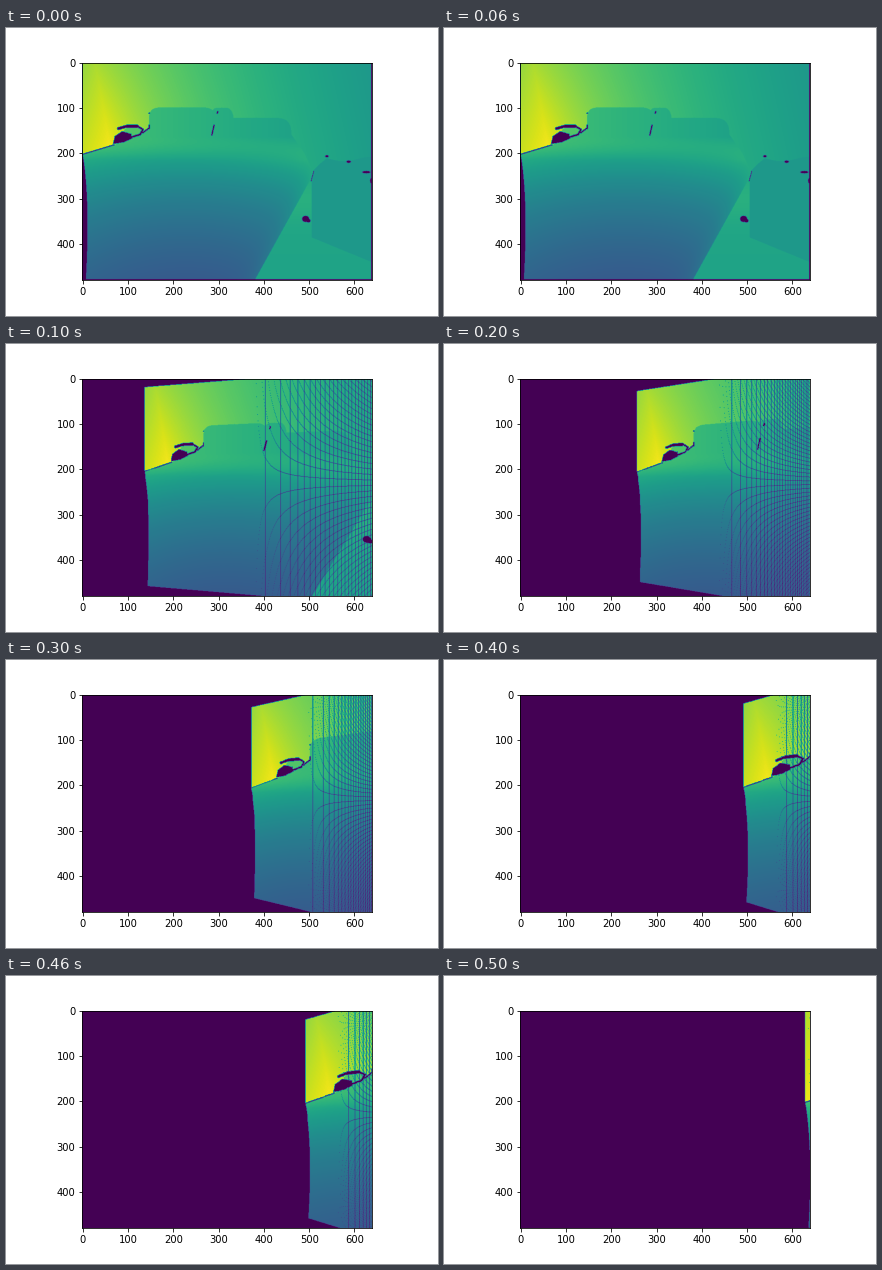
These frames come from a looping animation (432x288 px, 0.6 s). A matplotlib script:

```python
"""A depth map seen by a camera that yaws in equal steps, splatted pixel by pixel."""
import numpy as np
import matplotlib.pyplot as plt
from matplotlib.animation import FuncAnimation
from matplotlib.path import Path

W, H = 640, 480
FOCAL, CX, CY = 574.4, 320, 230
YAW_STEP = 0.2
FRAMES = 6

X, Y = np.meshgrid(np.arange(W, dtype=float), np.arange(H, dtype=float))
PIXELS = np.column_stack([X.ravel(), Y.ravel()])


def polygon(*points):
    return Path(points).contains_points(PIXELS).reshape(H, W)


def blob(x, y, rx, ry, power=2):
    """Ellipse, or a rounded box for a higher power."""
    return np.abs((X - x) / rx) ** power + np.abs((Y - y) / ry) ** power <= 1


def stroke(width, *points):
    """Mask of all pixels within width / 2 of a polyline."""
    mask = np.zeros((H, W), bool)
    for (x0, y0), (x1, y1) in zip(points, points[1:]):
        dx, dy = x1 - x0, y1 - y0
        t = np.clip(((X - x0) * dx + (Y - y0) * dy) / (dx * dx + dy * dy), 0, 1)
        mask |= np.hypot(X - x0 - t * dx, Y - y0 - t * dy) <= width / 2
    return mask


def wall_depth():
    """Two planes that meet in a bright ridge at the left."""
    right = 1 / (1.10 + 0.00115 * (X - 0.2 * Y) - 0.001 * Y * np.exp(-X / 150))
    left = 0.85 + 0.0004 * Y + 0.0012 * X
    return np.minimum(left, right)


def floor_depth():
    return 0.59 + 0.05 * np.exp(-((Y - 300) / 60) ** 2)


def sofa_depth():
    seat = 1 / (1.61 + 0.0065 * (Y - 195))
    seat += 0.05 * np.clip((X - 230) / 250, -1, 1) ** 2
    to_edge = np.clip(511 - 0.555 * (Y - 245) - X, 0, None)
    seat += 0.06 * np.exp(-to_edge / 20)
    back = 0.73 - 0.00032 * X
    blend = np.clip((Y - 165) / 50, 0, 1)
    return back * (1 - blend) + seat * blend


def sofa_mask():
    seat = polygon((-1, 203), (70, 182), (147, 148), (455, 150), (490, 200),
                   (511, 245), (380, 481), (-1, 481))
    left_cushion = blob(220, 160, 73, 61, 7)
    middle_bump = blob(308, 160, 27, 60, 4)
    right_cushion = blob(384, 200, 78, 78, 6)
    return seat | left_cushion | middle_bump | right_cushion


def missing_mask():
    """Places where the sensor has no reading."""
    broken = np.random.default_rng(4).random(H // 6).repeat(6)[:, None] < 0.6
    fall = np.clip((Y - 200) / 280, 0, 1)
    margin = (Y > 200) & (X < 12 * np.sin(2.4 * fall ** 0.75))
    border = (X < 1) | (Y < 1) | (X >= W - 2) | (Y >= H - 2)
    ornament = (polygon((68, 180), (72, 163), (88, 152), (108, 158),
                        (110, 168), (92, 176))
                | stroke(6, (80, 146), (98, 141), (122, 141))
                | stroke(4, (105, 166), (128, 159), (134, 148), (122, 141)))
    outline = (stroke(2, (0, 203), (70, 182))
               | stroke(3, (134, 155), (146, 146))
               | stroke(2, (148, 146), (148, 112)) & broken)
    crack = stroke(3, (300, 106), (293, 130), (285, 165)) & broken
    sofa_edge = stroke(1.5, (511, 240), (505, 262))
    specks = (blob(540, 207, 4, 2.5) | blob(588, 219, 5, 3)
              | blob(627, 242, 9, 3) | blob(638, 261, 3, 6)
              | blob(493, 345, 8, 7) | blob(499, 349, 5, 4))
    return margin | border | ornament | outline | crack | sofa_edge | specks


def build_scene():
    depth = wall_depth()
    chair_top = 213 - 5 * np.cos((X - 640) / 20)
    chair_top += np.clip(540 - X, 0, None)
    floor = (X > 365) & (Y > chair_top)
    armchair = floor & (X > 506) & (Y < 385 + 0.41 * (X - 505))
    sofa = sofa_mask()
    depth = np.where(floor, floor_depth(), depth)
    depth = np.where(armchair, 0.54, depth)
    depth = np.where(sofa, sofa_depth(), depth)
    depth = np.where(blob(112, 152, 20, 10), 0.74, depth)
    return np.where(missing_mask(), 0, depth)


SCENE = build_scene()


def rotated(yaw):
    """Forward-project every pixel; rounding leaves the unfilled curves."""
    ray = np.arctan((X - CX) / FOCAL)
    u = np.rint(CX + FOCAL * np.tan(ray + yaw)).astype(int)
    v = np.rint(CY + (Y - CY) * np.cos(ray) / np.cos(ray + yaw)).astype(int)
    ok = ((np.abs(ray + yaw) < 1.4) & (u >= 0) & (u < W)
          & (v >= 0) & (v < H) & (SCENE > 0))
    view = np.zeros((H, W))
    view[v[ok], u[ok]] = SCENE[ok]
    return view


plt.rcParams.update({"font.family": "DejaVu Sans", "font.size": 10,
                     "figure.subplot.bottom": 0.125})
fig, ax = plt.subplots(figsize=(6, 4), dpi=72)
image = ax.imshow(SCENE, cmap="viridis")


def update(frame):
    view = rotated(frame * YAW_STEP)
    image.set_data(view)
    image.set_clim(0, 1.02 * view.max())
    return [image]


anim = FuncAnimation(fig, update, frames=FRAMES, interval=100, repeat=True,
                     init_func=lambda: update(0))
plt.show()
```
